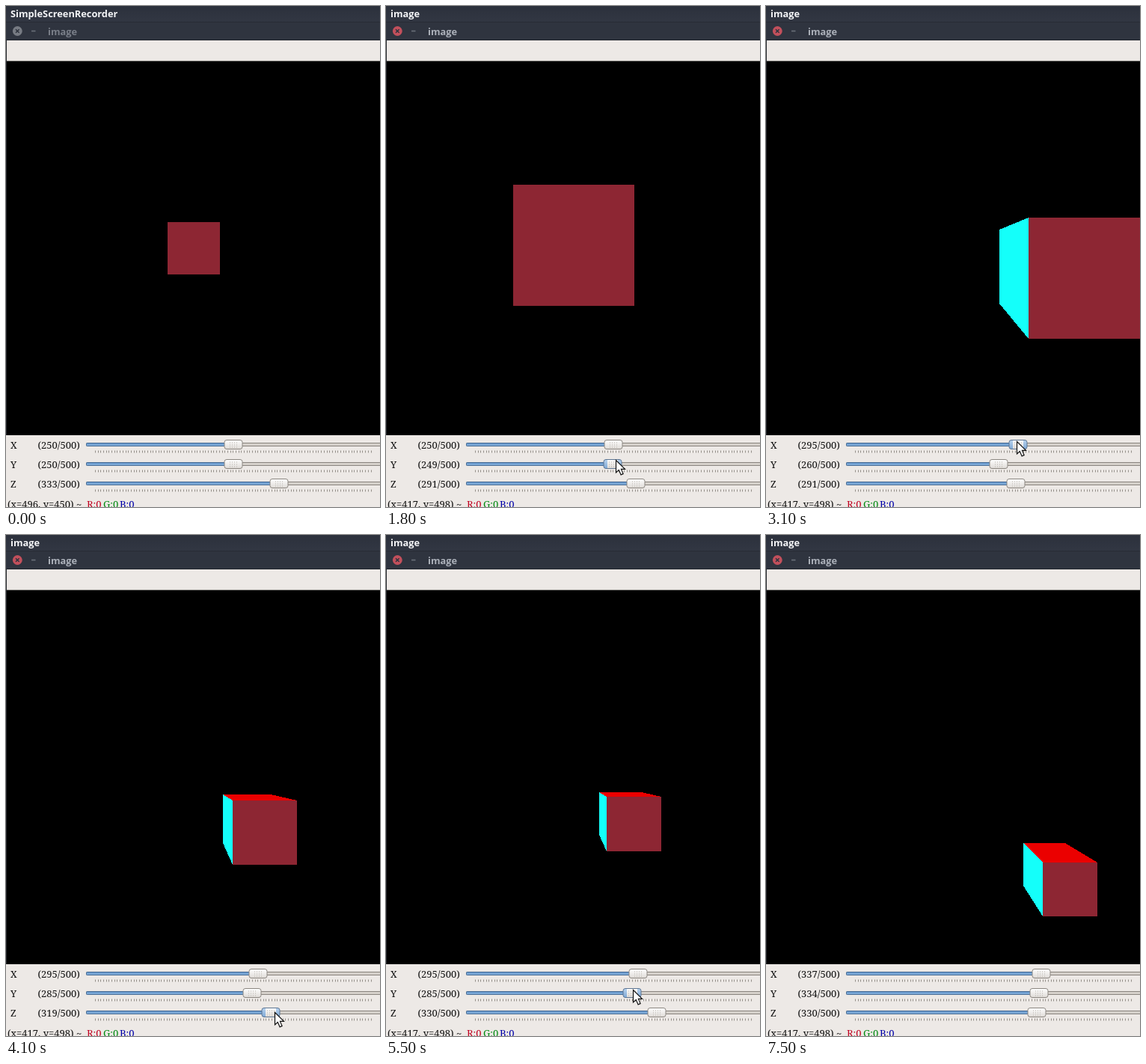
These frames come from a looping animation (500x670 px, 7800 ms). An HTML page:

```html
<!DOCTYPE html>
<html lang="en">
<head>
<meta charset="utf-8">
<title>image</title>
<style>
html, body { margin: 0; width: 100%; height: 100%; overflow: hidden; background: #ede9e6; }
svg { display: block; }
text { white-space: pre; }
.title { font: bold 12.8px "Open Sans", "Noto Sans", sans-serif; }
.label { font: 13px "Noto Serif", "Liberation Serif", serif; fill: #111; }
.crisp { shape-rendering: crispEdges; }
</style>
</head>
<body>
<svg width="500" height="670" viewBox="0 0 500 670">
  <defs>
    <linearGradient id="bar" x2="0" y2="1"><stop stop-color="#2c313c"/><stop offset="1" stop-color="#323743"/></linearGradient>
    <linearGradient id="blue" x2="0" y2="1"><stop stop-color="#5c8fc6"/><stop offset="1" stop-color="#8fb9e2"/></linearGradient>
    <linearGradient id="thumb" x2="0" y2="1"><stop stop-color="#fff"/><stop offset="1" stop-color="#dfdbd7"/></linearGradient>
    <linearGradient id="hot" x2="0" y2="1"><stop stop-color="#b9d3ee"/><stop offset="1" stop-color="#7fa9d6"/></linearGradient>
    <clipPath id="view"><rect x="1" y="74" width="499" height="500"/></clipPath>
  </defs>
  <g class="crisp">
    <rect width="500" height="670" fill="#ede9e6"/>
    <rect width="500" height="22" fill="url(#bar)"/>
    <rect y="22" width="500" height="24" fill="#2f343f"/>
    <rect y="21" width="500" height="1" fill="#272b34"/>
    <rect y="45" width="500" height="1" fill="#22262e"/>
    <rect y="46" width="1" height="528" fill="#24272d"/>
    <rect x="1" y="73" width="499" height="501" fill="#000"/>
    <rect x="1" y="73" width="499" height="1" fill="#8b8986"/>
  </g>
  <text id="app" class="title" x="6" y="15" fill="#f4f5f7"></text>
  <circle id="close" cx="15.3" cy="33.5" r="6.4"/>
  <path d="M13 31.2l4.6 4.6m0-4.6l-4.6 4.6" stroke="#2f343f" stroke-width="1.6"/>
  <path d="M34 33.5h5.5" stroke="#696e78" stroke-width="1.6"/>
  <text id="name" class="title" x="56" y="39">image</text>
  <g id="cube" class="crisp" clip-path="url(#view)"></g>
  <g id="sliders"></g>
  <g class="label">
    <text id="pos" x="2" y="670.5"></text>
    <text x="108" y="670.5" style="fill:#c00020">R:0</text>
    <text x="130" y="670.5" style="fill:#008a10">G:0</text>
    <text x="152" y="670.5" style="fill:#0000a8">B:0</text>
  </g>
  <path id="cursor" d="M0 0V16.5L3.8 13 6.6 19.4 9.6 18.1 6.9 11.9H12Z" fill="#fff" stroke="#111" stroke-width="1.2"/>
</svg>
<script>
const LOOP = 7800, STEP = 100, LAST = 7500;
const $ = id => document.getElementById(id);

// Slider values over time: time, value
const tracks = [
  [[2100, 250], [2500, 296], [2800, 302], [3100, 295], [6200, 295], [6500, 349], [6800, 352], [7200, 337]],
  [[1000, 250], [1300, 193], [1900, 260], [3300, 260], [3600, 285], [5500, 285], [5900, 334]],
  [[500, 333], [800, 291], [3700, 291], [4100, 319], [4500, 302], [4800, 307], [5300, 330]]
];

// Grabs: start, end, slider, cursor offset from the thumb
const grabs = [
  [500, 800, 2, 2, -3], [1000, 1900, 1, 4, -6], [2100, 3100, 0, -2, -5], [3300, 3600, 1, 2, -4],
  [3700, 4400, 2, 5, -1], [4500, 5300, 2, -4, -13], [5500, 5900, 1, 1, -5], [6100, 7200, 0, 0, -5]
];

const mix = (a, b, p) => a + (b - a) * p;
const thumbX = v => Math.round(119.25 + v * .737);
const rowY = i => 586.5 + i * 26;

function valueAt(track, t) {
  const i = track.findIndex(k => k[0] > t);
  if (i === 0) return track[0][1];
  if (i < 0) return track[track.length - 1][1];
  const [a, b] = [track[i - 1], track[i]];
  return Math.round(mix(a[1], b[1], (t - a[0]) / (b[0] - a[0])));
}

const onThumb = ([, , row, dx, dy], t) => [thumbX(valueAt(tracks[row], t)) + dx, Math.round(rowY(row) + dy)];

function cursorAt(t) {
  const held = grabs.find(g => t >= g[0] && t <= g[1]);
  if (held) return onThumb(held, t);
  const next = grabs.findIndex(g => g[0] > t);
  const prev = grabs[next < 0 ? grabs.length - 1 : next - 1];
  const from = prev ? prev[1] : 100, to = next < 0 ? LAST : grabs[next][0];
  const a = prev ? onThumb(prev, from) : [530, 470];
  const b = next < 0 ? [520, 630] : onThumb(grabs[next], to);
  const p = Math.max(0, (t - from) / (to - from));
  return a.map((n, i) => Math.round(mix(n, b[i], p)));
}

// Perspective box: 40 wide and high, 20 deep
function cube([x, y, z]) {
  const face = depth => {
    const s = 125 / depth;
    const at = (n, d) => Math.floor(250 + (n - 250 + d) * s);
    return { l: at(x, -20) + 1, r: at(x, 20) + 2, t: at(y, -20) + 74, b: at(y, 20) + 75 };
  };
  const f = face(z - 260), k = face(z - 240);
  const poly = (fill, ...pts) => `<polygon fill="${fill}" points="${pts.join(' ')}"/>`;
  let out = '';
  if (f.t > k.t) out += poly('#eb0000', k.l, k.t, k.r, k.t, f.r, f.t, f.l, f.t);
  if (f.b < k.b) out += poly('#00005f', f.l, f.b, f.r, f.b, k.r, k.b, k.l, k.b);
  if (f.l > k.l) out += poly('#14fffa', k.l, k.t, f.l, f.t, f.l, f.b, k.l, k.b);
  return out + poly('#8d2633', f.l, f.t, f.r, f.t, f.r, f.b, f.l, f.b);
}

let ticks = '';
for (let i = 0; i <= 100; i++) ticks += `M${Math.round(119 + i * 3.685) + .5} 8v3`;

let dots = '';
for (let i = 0; i < 12; i++) dots += `M${i % 4 * 3 - 5} ${Math.floor(i / 4) * 3 - 2.5}h1`;

const thumbEnds = '<path d="M-7 -6h-2a3 3 0 0 0-3 3v6a3 3 0 0 0 3 3h2zM7 -6h2a3 3 0 0 1 3 3v6a3 3 0 0 1-3 3h-2z" fill="url(#hot)"/>';

function slider(name, value, row, hot) {
  const c = thumbX(value);
  const box = style => `<rect x="-12" y="-6" width="24" height="12" rx="3" ${style}/>`;
  const trough = (w, style) => `<rect x="107.5" y="-2" width="${w}" height="4" rx="1" ${style}/>`;
  return `<g transform="translate(0 ${rowY(row)})">
    <text class="label" x="6" y="5">${name}</text>
    <text class="label" x="42.5" y="5">(${value}/500)</text>
    ${trough(400, 'fill="#d6d1cb" stroke="#89847e"')}
    ${trough(c - 108, 'fill="url(#blue)" stroke="#476b94"')}
    <path d="${ticks}" stroke="#938e88"/>
    <g transform="translate(${c})">${box('fill="url(#thumb)"')}${hot ? thumbEnds : ''}
    ${box(`fill="none" stroke="${hot ? '#5d7592' : '#8c8781'}"`)}
    <path d="${dots}" stroke="#b5b0aa"/></g></g>`;
}

function draw(t) {
  const active = t >= 200;
  const vals = tracks.map(k => valueAt(k, t));
  const held = grabs.find(g => t >= g[0] && t <= g[1]);
  const [cx, cy] = cursorAt(t);
  $('app').textContent = active ? 'image' : 'SimpleScreenRecorder';
  $('close').setAttribute('fill', active ? '#c2505c' : '#777b83');
  $('name').setAttribute('fill', active ? '#adb2bb' : '#7a7f89');
  $('pos').textContent = t >= 400 ? '(x=417, y=498) ~' : '(x=496, y=450) ~';
  $('cube').innerHTML = cube(vals);
  $('sliders').innerHTML = vals.map((v, i) => slider('XYZ'[i], v, i, held && held[2] === i)).join('');
  $('cursor').setAttribute('transform', `translate(${cx + .5} ${cy + .5})`);
}

const start = performance.now();
let shown = -1;
function tick() {
  const ms = Math.max(0, performance.now() - start) % LOOP;
  const t = Math.min(LAST, Math.floor(ms / STEP) * STEP);
  if (t !== shown) draw(shown = t);
  requestAnimationFrame(tick);
}
tick();
</script>
</body>
</html>
```
